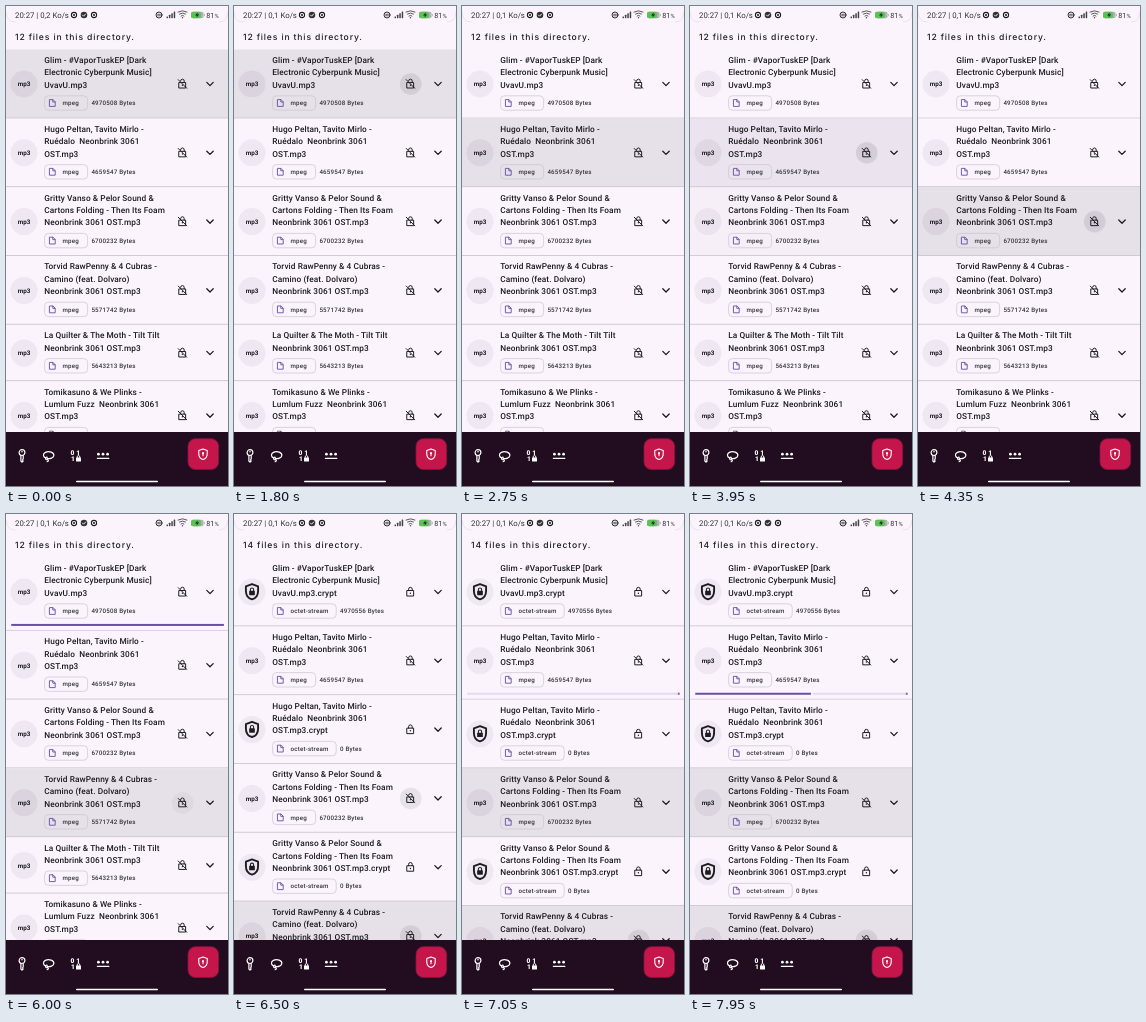
Recreate the animation shown at these times as an HTML page. Size 222 by 480 pixels, loop 8000 ms.

```html
<!DOCTYPE html>
<html lang="en">
<head>
<meta charset="utf-8">
<title>File list</title>
<style>
  html, body { margin: 0; width: 100%; height: 100%; overflow: hidden; background: #fbf4fd; }
  svg { display: block; width: 100%; height: 100%; }
  text { font-family: Roboto, sans-serif; fill: #1d1b20; white-space: pre; text-rendering: geometricPrecision; }
  .title { font-size: 8.27px; font-weight: 500; letter-spacing: .08px; }
  .small { font-size: 6.2px; font-weight: 500; letter-spacing: .2px; fill: #36333a; }
  .head { font: 500 8.6px Inter, sans-serif; letter-spacing: .85px; }
  .status { font-size: 7.8px; fill: #333; }
  .badge { font-size: 6.3px; font-weight: 600; text-anchor: middle; }
  .bits { font-size: 6.6px; font-weight: 800; fill: #fff; }
  .line { fill: none; stroke: #1d1b20; stroke-width: 1.1; stroke-linejoin: round; stroke-linecap: round; }
  .white { fill: none; stroke: #fff; stroke-width: 1.2; stroke-linejoin: round; stroke-linecap: round; }
</style>
</head>
<body>
<svg id="stage" viewBox="0 0 222 480"></svg>
<script>
const LOOP = 8000;
const LINE = 12.4;
const BAR_SPACE = 4.4;
const INK = '#1d1b20', SOFT_INK = '#444', PAPER = '#fbf4fd', PURPLE = '#6750a4';
const SHIELD = 'M0-8 6.4-5.6V-.8C6.4 3.4 3.7 6.9 0 8-3.7 6.9-6.4 3.4-6.4-.8V-5.6Z';
const stage = document.getElementById('stage');
const start = document.timeline.currentTime ?? 0;

function add(parent, tag, attrs = {}, text) {
  const node = document.createElementNS('http://www.w3.org/2000/svg', tag);
  for (const [key, value] of Object.entries(attrs)) node.setAttribute(key, value);
  if (text !== undefined) node.textContent = text;
  parent.append(node);
  return node;
}

const group = (parent, x = 0, y = 0, scale = 1) =>
  add(parent, 'g', { transform: `translate(${x} ${y}) scale(${scale})` });
const rect = (parent, x, y, width, height, rx, fill) =>
  add(parent, 'rect', { x, y, width, height, rx, fill });
const circle = (parent, cx, cy, r, fill) => add(parent, 'circle', { cx, cy, r, fill });
const ring = (parent, cx, cy, r, cls = 'line') => add(parent, 'circle', { cx, cy, r, class: cls });
const label = (parent, x, y, cls, text) => add(parent, 'text', { x, y, class: cls }, text);
function path(parent, d, cls = 'line', style = '') {
  return add(parent, 'path', { d, class: cls, style });
}

// Steps are [time, value]; two steps at one time make a hard change.
function play(node, prop, steps, format = v => v) {
  const all = [...steps, [LOOP, steps.at(-1)[1]]];
  if (all[0][0] > 0) all.unshift([0, all[0][1]]);
  const frames = all.map(([t, v]) => ({ offset: t / LOOP, [prop]: format(v) }));
  node.animate(frames, { duration: LOOP, iterations: Infinity }).startTime = start;
}

const fade = (node, ...steps) => play(node, 'opacity', steps);
const switchAt = (time, from, to) => [[time, from], [time, to]];

function lockIcon(parent, locked) {
  const g = group(parent, 176.4, 34, .9);
  path(g, 'M-3.6-1.4H3.6V4.7H-3.6Z' + (locked
    ? 'M-2-1.4V-3a2 2 0 0 1 4 0V-1.4'
    : 'M-2-3.3A2 2 0 0 1 2-3V-1.4M-4.6-4.6 4.8 4.9'));
  circle(g, 0, 1.6, .8, INK);
}

function fileRow(parent, y, { lines, type = 'mpeg', size }, first) {
  const g = group(parent, 0, y);
  const height = 31.6 + lines.length * LINE;
  const highlight = rect(g, 0, 0, 222, height - .5, 0, 'rgba(29,27,32,.09)');
  highlight.setAttribute('opacity', 0);
  if (!first) rect(g, 0, -1, 222, .9, 0, '#cdc6d2');

  const locked = type !== 'mpeg';
  const mid = group(g, 0, height / 2 - 34.2);
  circle(mid, 18, 34.2, 13.5, 'rgba(29,27,32,.055)');
  if (locked) {
    const badge = group(mid, 18, 34, .95);
    path(badge, SHIELD, 'line', 'stroke-width:2');
    rect(badge, -3, -1.2, 6, 4.7, .7, INK);
    path(badge, 'M-1.7-1V-2.4a1.7 1.7 0 0 1 3.4 0V-1');
  } else {
    label(mid, 18, 36.5, 'badge', 'mp3');
  }
  const ripple = circle(mid, 176.7, 34.2, 10.8, INK);
  ripple.setAttribute('opacity', 0);
  lockIcon(mid, locked);
  path(mid, 'M200.8 32.6 204 35.8 207.2 32.6', 'line', 'stroke-width:1.3');

  lines.forEach((text, i) => label(g, 38.3, 13.4 + i * LINE, 'title', text));
  const chip = group(g, 0, 16.2 + lines.length * LINE);
  const width = locked ? 63.6 : 43;
  add(chip, 'rect', { x: 38.6, y: -7.2, width, height: 14.4, rx: 3.8, fill: 'none', stroke: '#cac4d0', 'stroke-width': .7 });
  path(chip, 'M43.8-3.4H47L49.2-1.2V3.4H43.8ZM46.8-3.2V-1H49', 'line', `stroke:${PURPLE};stroke-width:.9`);
  label(chip, 56.5, 2.2, 'small', type);
  label(chip, 38.6 + width + 3.8, 2.2, 'small', `${size} Bytes`);
  return { highlight, ripple, height };
}

function fileList(count, rows, barRow) {
  const list = add(stage, 'g');
  label(list, 9, 33.8, 'head', `${count} files in this directory.`);
  const below = add(list, 'g');
  let y = 43.6, barY;
  const items = rows.map((data, i) => {
    const item = fileRow(i > barRow ? below : list, y, data, i === 0);
    y += item.height;
    if (i === barRow) barY = y - 2.5;
    return item;
  });
  const bar = group(list, 0, barY);
  rect(bar, 5, 0, 213, 2.1, 1, '#e4daf3');
  const gap = rect(bar, 4, -.2, 0, 2.5, 0, PAPER);
  const fill = rect(bar, 5, 0, 0, 2.1, 1, PURPLE);
  circle(bar, 216.8, 1.05, 1.05, PURPLE);
  const progress = (shown, steps) => {
    fade(bar, ...switchAt(shown, 0, 1));
    play(below, 'transform', switchAt(shown, 0, BAR_SPACE), v => `translate(0px, ${v}px)`);
    play(fill, 'width', steps, v => `${v}px`);
    play(gap, 'width', steps, v => `${v ? v + 3 : 0}px`);
  };
  return { list, items, progress };
}

const glim = ['Glim - #VaporTuskEP [Dark', 'Electronic Cyberpunk Music]', 'UvavU.mp3'];
const hugo = ['Hugo Peltan, Tavito Mirlo -', 'Ruédalo  Neonbrink 3061', 'OST.mp3'];
const gritty = ['Gritty Vanso & Pelor Sound &', 'Cartons Folding - Then Its Foam', 'Neonbrink 3061 OST.mp3'];
const torvid = ['Torvid RawPenny & 4 Cubras -', 'Camino (feat. Dolvaro)', 'Neonbrink 3061 OST.mp3'];
const quilt = ['La Quilter & The Moth - Tilt Tilt', 'Neonbrink 3061 OST.mp3'];
const tomika = ['Tomikasuno & We Plinks -', 'Lumlum Fuzz  Neonbrink 3061', 'OST.mp3'];

const plain = (lines, size) => ({ lines, size });
const crypt = (lines, size) =>
  ({ lines: [...lines.slice(0, -1), lines.at(-1) + '.crypt'], size, type: 'octet-stream' });

const before = [
  plain(glim, 4970508), plain(hugo, 4659547), plain(gritty, 6700232),
  plain(torvid, 5571742), plain(quilt, 5643213), plain(tomika, 6058054)
];
const after = [
  crypt(glim, 4970556), plain(hugo, 4659547), crypt(hugo, 0),
  plain(gritty, 6700232), crypt(gritty, 0), plain(torvid, 5571742)
];

rect(stage, 0, 0, 222, 480, 0, PAPER);
const a = fileList(12, before, 0);
const b = fileList(14, after, 1);
fade(a.list, ...switchAt(6500, 1, 0));
fade(b.list, ...switchAt(6500, 0, 1));

a.progress(4800, [[4800, 45], [4900, 45], [5500, 163], [5650, 163], [5900, 213]]);
b.progress(6650, [[7300, 0], [7450, 28], [7950, 116], [8000, 125]]);

fade(a.items[0].highlight, [2650, 1], [2750, 0]);
fade(a.items[1].highlight, [2650, 0], [2750, 1], [3900, 1], [4100, 0]);
fade(a.items[2].highlight, [3900, 0], [4100, 1], [5600, 1], [5800, 0]);
fade(a.items[3].highlight, [5600, 0], [5800, 1]);
fade(b.items[3].highlight, [6600, 0], [6800, 1]);
fade(b.items[5].highlight, [0, 1]);

fade(a.items[0].ripple, [1800, 0], [1800, .09], [2100, .14], [2300, .14], [2550, 0]);
fade(a.items[1].ripple, [3500, 0], [3750, .12], [3900, .12], [4200, .02], [4350, .02], [4350, 0]);
fade(a.items[2].ripple, [3950, 0], [4200, .1], [4900, .1], [5250, .24], [5600, .24], [5850, 0]);
fade(a.items[3].ripple, [5850, 0], [6200, .09]);
fade(b.items[3].ripple, [6600, .09], [6800, 0]);
fade(b.items[5].ripple, [0, .09]);

// Status bar
rect(stage, 0, 0, 222, 18, 0, PAPER);
path(stage, 'M.4 7Q.4 16 9 16M221.6 7Q221.6 16 213 16', 'line', 'stroke:#e6dfe9;stroke-width:.8');
const fast = label(stage, 9, 11.6, 'status', '20:27 | 0,2 Ko/s');
const slow = label(stage, 9, 11.6, 'status', '20:27 | 0,1 Ko/s');
fade(fast, ...switchAt(900, 1, 0));
fade(slow, ...switchAt(900, 0, 1));
const status = group(stage, 0, 9);
for (const x of [68, 88]) {
  ring(status, x, 0, 2.6);
  circle(status, x, 0, 1, INK);
}
circle(status, 78, 0, 3.3, '#333');
path(status, 'M76.5.1 77.6 1.2 79.6-1', 'white', 'stroke-width:.9');
ring(status, 153, 0, 3, 'line').style.strokeWidth = .9;
path(status, 'M151.6-.7H154.4M151.6.8H154.4', 'line', 'stroke-width:.7');
for (let i = 0; i < 4; i++) rect(status, 160.5 + i * 2.4, 1.4 - i * 1.6, 1.5, 1.8 + i * 1.6, .4, SOFT_INK);
for (const r of [2, 4, 6]) {
  const side = r * .75;
  path(status, `M${176.5 - side} ${3 - r}Q176.5 ${2 - r * 1.25} ${176.5 + side} ${3 - r}`, 'line', `stroke:${SOFT_INK};stroke-width:.9`);
}
circle(status, 176.5, 2.8, .7, SOFT_INK);
rect(status, 185, -3.3, 12.6, 6.6, 2, '#b5b0b8');
rect(status, 185, -3.3, 10, 6.6, 2, '#5cc258');
rect(status, 198, -1.2, .9, 2.4, .4, '#b5b0b8');
add(status, 'path', { d: 'M191.8-2.8 189 .5H191L190.4 2.8 193.2-.5H191.2Z', fill: INK });
label(status, 200.3, 2.6, 'status', '81').style.fontSize = '7.2px';
label(status, 208.4, 2.6, 'status', '%').style.fontSize = '5.8px';

// Bottom bar
rect(stage, 0, 426, 222, 54, 0, '#210d1f');
const nav = group(stage, 0, 450);
ring(nav, 16, -3.4, 2.9, 'white');
circle(nav, 16, -4.2, .8, '#fff');
path(nav, 'M14.9-.4V5L16 6.2 17.2 5 16.5 4 17.2 3V-.4', 'white');
path(nav, 'M40 2.2C36.8 1 36.6-2.2 39.4-3.6 43-5.3 48.4-3.6 47.8-.4 47.4 2 44.2 3 41.4 2.4M41.2 1.2A1.3 1.3 0 1 0 41.4 3.6C42.8 4.2 42.6 5.4 41.2 5.6', 'white');
label(nav, 64.6, -.6, 'bits', '0');
label(nav, 70.2, -.6, 'bits', '1');
label(nav, 65, 5.4, 'bits', '1');
rect(nav, 70, 1.6, 5, 3.9, .6, '#fff');
path(nav, 'M71.2 1.6V.9a1.3 1.3 0 0 1 2.6 0V1.6', 'white', 'stroke-width:1');
for (const x of [92.4, 97, 101.6]) circle(nav, x, -1.8, 1.4, '#fff');
path(nav, 'M91.4 2.4H102.8', 'white');

const button = rect(stage, 182, 432.7, 30.6, 30.8, 7.5, '#c4164a');
button.setAttribute('stroke', '#8a143f');
button.setAttribute('stroke-width', .8);
const shield = group(stage, 197, 448.2);
path(shield, SHIELD, 'white', 'stroke-width:1.7').setAttribute('transform', 'scale(.66)');
circle(shield, 0, -1, 1.1, '#fff');
path(shield, 'M0-.6V1.6', 'white', 'stroke-width:1');
rect(stage, 70, 474.7, 82, 1.6, .8, '#fff');
</script>
</body>
</html>
```
